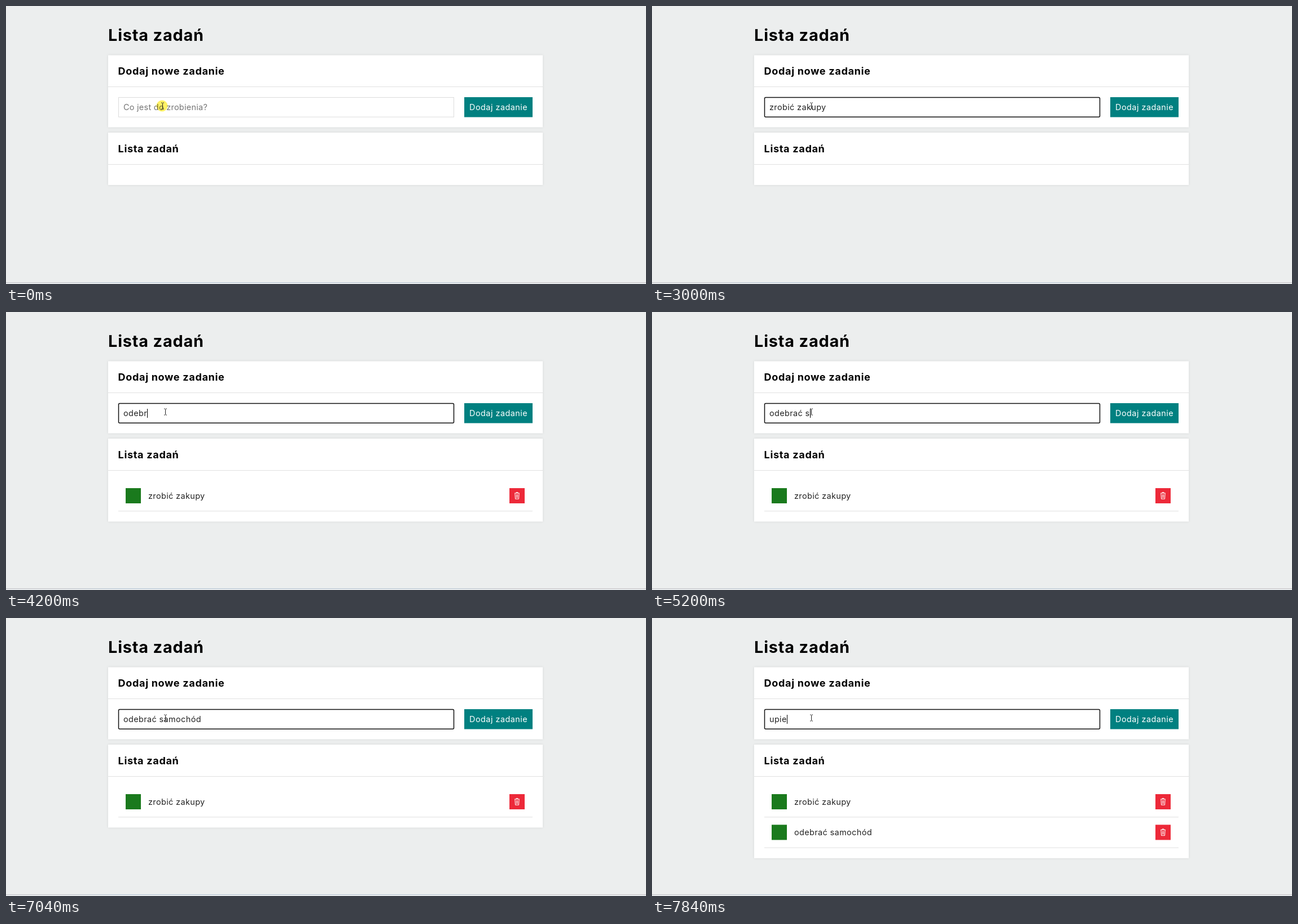
Animation, 1134 px wide and 494 px high, one loop 8 s. Source, as an HTML page:

```html
<!DOCTYPE html>
<html lang="pl">
<head>
<meta charset="utf-8">
<title>Lista zadań</title>
<style>
  html, body { margin: 0; width: 100%; height: 100%; overflow: hidden; background: #eceeee; }
  svg { display: block; }
  text { font: 14.4px Montserrat, Inter, sans-serif; letter-spacing: .4px; white-space: pre; fill: #222; }
  .title { font-size: 28.8px; font-weight: 700; letter-spacing: .85px; fill: #000; }
  .head { font-size: 18px; font-weight: 700; letter-spacing: .7px; fill: #000; }
  .hint { fill: #757575; letter-spacing: .3px; }
  .label { fill: #fff; letter-spacing: .5px; }
  .card { fill: #fff; filter: drop-shadow(0 0 2px rgba(0, 0, 0, .09)); }
  .rule { fill: #e0e0e0; }
  .field { fill: #fff; stroke: #dcdcdc; }
  .field.focus { stroke: #101010; stroke-width: 1.5; rx: 2px; }
  .glow { fill: #fff04a; fill-opacity: .85; mix-blend-mode: multiply; }
</style>
</head>
<body>
<svg width="1134" height="494" viewBox="0 0 1134 494">
  <defs>
    <linearGradient id="edge">
      <stop offset=".08" stop-color="#c3c3c7"/>
      <stop offset=".18" stop-color="#b4c4d4"/>
      <stop offset=".7" stop-color="#b9c6d2"/>
      <stop offset=".8" stop-color="#c6c2c6"/>
    </linearGradient>
    <g id="bin" fill="none" stroke="#fff" stroke-width="1">
      <path d="M-4.5 -4.5H4.5M-1.5 -4.5V-6H1.5V-4.5M-3.7 -4L-3 5.7H3L3.7 -4"/>
      <path d="M-1.4 -2.5V4M0 -2.5V4M1.4 -2.5V4" stroke-width=".7"/>
    </g>
  </defs>
  <rect width="1134" height="494" fill="#eceeee"/>
  <rect y="491" width="1134" height="1" fill="url(#edge)"/>
  <rect y="492" width="1134" height="2" fill="#e9ecee"/>

  <text class="title" x="181" y="61.5">Lista zadań</text>

  <rect class="card" x="181" y="87.5" width="770" height="128"/>
  <rect class="rule" x="181" y="143" width="770" height="1"/>
  <text class="head" x="198.5" y="122">Dodaj nowe zadanie</text>
  <rect id="field" class="field" x="199.5" y="162.5" width="594" height="34.7"/>
  <text id="hint" class="hint" x="208" y="185">Co jest do zrobienia?</text>
  <text id="typed" x="208" y="185"></text>
  <rect id="caret" y="172" width="1" height="16"/>
  <rect x="812" y="162" width="121" height="35.5" fill="#008080"/>
  <text class="label" x="821" y="185">Dodaj zadanie</text>

  <rect id="list" class="card" x="181" y="225" width="770"/>
  <rect class="rule" x="181" y="281" width="770" height="1"/>
  <text class="head" x="198.5" y="259.5">Lista zadań</text>
  <g id="tasks"></g>

  <g id="pointer">
    <circle id="glow" class="glow" cx="-1" r="10"/>
    <path d="M-2.5 -5.5H-.7M.7 -5.5H2.5M0 -5V5M-2.5 5.5H-.7M.7 5.5H2.5" fill="none" stroke="#222"/>
  </g>
</svg>
<script>
const LOOP = 8000, TICK = 200, FOCUS = 400, ROW = 54.4;

// Each burst types its keys evenly over a number of ticks.
const TASKS = [
  { submit: 3200, bursts: [
    { at: 600, ticks: 6, keys: "zrobić " },
    { at: 2000, ticks: 2, keys: "zak" },
    { at: 2600, ticks: 2, keys: "upy" }] },
  { submit: 7240, bursts: [
    { at: 3400, ticks: 1, keys: "od" },
    { at: 3800, ticks: 4, keys: "ebra" },
    { at: 4800, ticks: 6, keys: "ć samoc" },
    { at: 6200, ticks: 1, keys: "h" },
    { at: 6640, ticks: 2, keys: "ód" }] },
  { submit: Infinity, bursts: [
    { at: 7440, ticks: 2, keys: "up" },
    { at: 7840, ticks: 1, keys: "ie" }] }
];

const el = id => document.getElementById(id);
const show = (node, on) => { node.style.display = on ? "" : "none"; };

function burstText({ at, ticks, keys }, t) {
  const done = Math.floor((t - at) / TICK) + 1;
  const part = Math.min(Math.max(done / ticks, 0), 1);
  return keys.slice(0, Math.ceil(part * keys.length - .5));
}

const textAt = (task, t) => task.bursts.map(b => burstText(b, t)).join("");

function addRow(task, i) {
  const row = document.createElementNS("http://www.w3.org/2000/svg", "g");
  row.setAttribute("transform", `translate(0 ${i * ROW})`);
  row.innerHTML = `
    <rect x="212" y="313" width="27" height="27" fill="#1a7a1d"/>
    <text x="252" y="331.8">${textAt(task, LOOP)}</text>
    <rect x="892" y="313" width="27" height="27" fill="#ed2939"/>
    <use href="#bin" x="905.5" y="326.5"/>
    <rect class="rule" x="199" y="353.3" width="734" height="1"/>`;
  el("tasks").append(row);
}

function draw(t) {
  const count = TASKS.filter(task => task.submit <= t).length;
  const task = TASKS[count];
  const text = textAt(task, t);
  const focused = t >= FOCUS;

  el("field").classList.toggle("focus", focused);
  el("typed").textContent = text;
  show(el("hint"), !text);
  show(el("caret"), focused && t < task.submit - TICK);
  const width = text ? el("typed").getComputedTextLength() : 0;
  el("caret").setAttribute("x", Math.round(208 + width));

  el("list").setAttribute("height", 93 + count * ROW);
  [...el("tasks").children].forEach((row, i) => show(row, i < count));

  el("pointer").setAttribute("transform", `translate(${t < TICK ? 277.5 : 282.5} 177.5)`);
  show(el("glow"), t < FOCUS + TICK);
}

TASKS.slice(0, -1).forEach(addRow);
const begin = performance.now();
function tick() {
  draw((performance.now() - begin) % LOOP);
  requestAnimationFrame(tick);
}
tick();
</script>
</body>
</html>
```
